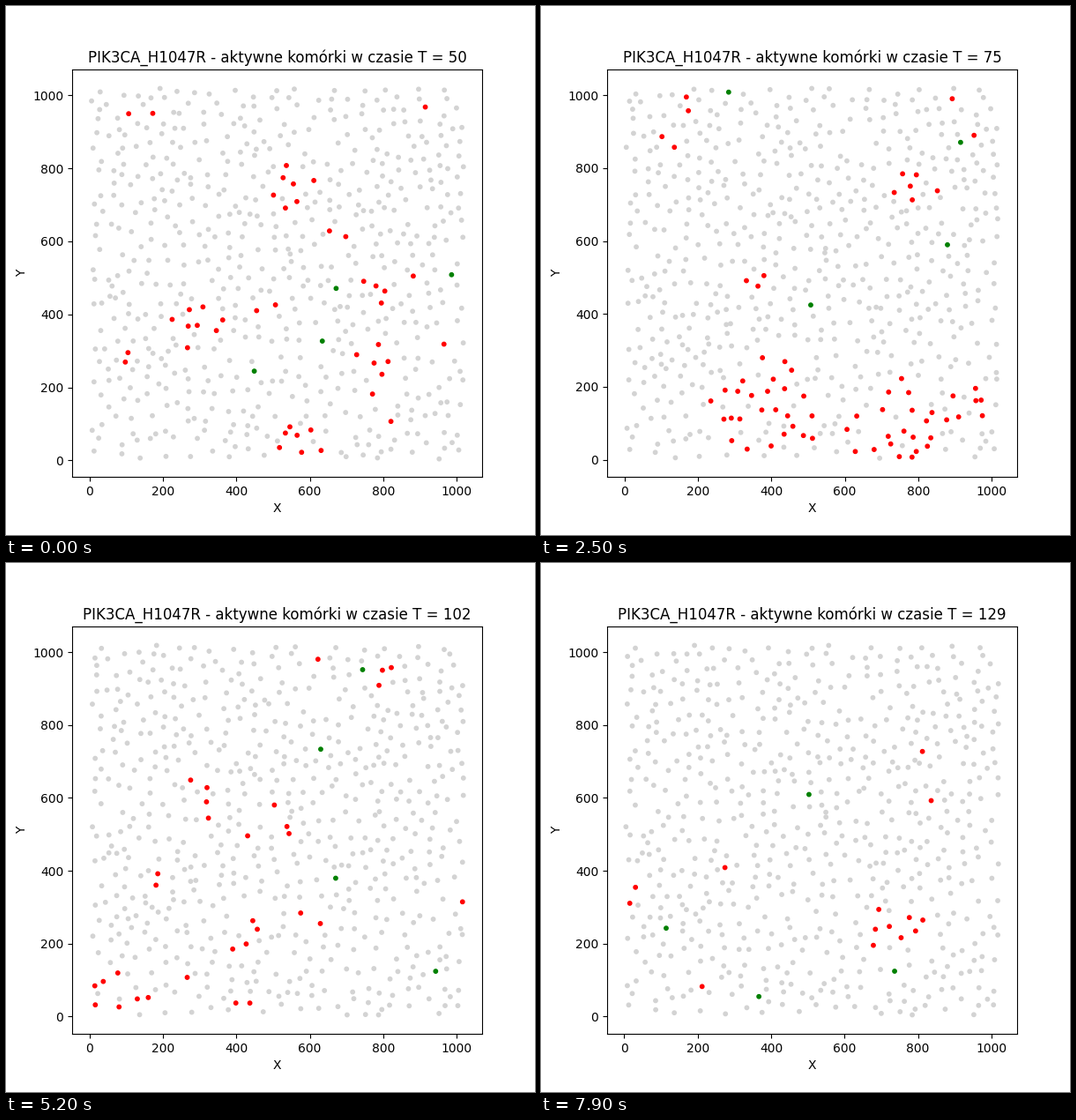
These frames come from a looping animation (600x600 px, 8 s). A matplotlib script:

```python
import numpy as np
import matplotlib.pyplot as plt
from matplotlib.animation import FuncAnimation

FRAMES, INTERVAL, START = 80, 100, 50
CELLS, LOW, HIGH = 625, 4, 1019
COLORS = np.array(["lightgray", "red", "green"])
RED, GREEN = 1, 2
LIFETIME = 6

# Largest bursts: peak time, x, y, number of active cells
BURSTS = [
    (50, 291, 371, 8), (50, 554, 757, 7),
    (75, 378, 135, 26), (75, 720, 64, 14),
    (85, 141, 705, 13), (85, 464, 368, 9), (85, 1003, 538, 9),
    (117, 907, 538, 8),
]

rng = np.random.default_rng(1047)


def scatter_cells():
    """Loosely even spread that includes the burst centres."""
    points = [np.array(burst[1:3], float) for burst in BURSTS]
    while len(points) < CELLS:
        candidates = rng.uniform(LOW, HIGH, (6, 2))
        gaps = np.linalg.norm(candidates[:, None] - np.array(points), axis=2).min(axis=1)
        points.append(candidates[gaps.argmax()])
    return np.array(points)


def activate(state, cell, first, length, kind=RED):
    state[max(first, 0):max(first + length, 0), cell] = kind


def spread(state, peak, x, y, count):
    """Activity runs outwards from a centre and is widest at the peak."""
    distance = np.hypot(*(home - (x, y)).T)
    near = distance.argsort()[:int(1.6 * count) + 1]
    others = rng.choice(near[1:], count - 1, replace=False)
    for cell in [near[0], *others]:
        delay = round(3 * distance[cell] / distance[near[-1]])
        activate(state, cell, peak - 4 + delay, LIFETIME)


def build_activity():
    state = np.zeros((FRAMES, CELLS), int)
    pending = 0
    for peak in range(-2, FRAMES + 4):
        # Enough small waves to hold a level that falls off late in the loop
        pending += np.interp(peak, [52, 67], [32, 14]) / LIFETIME
        while pending > 0:
            count = int(rng.integers(1, 8))
            spread(state, peak, *rng.uniform(LOW, HIGH, 2), count)
            pending -= count
    for peak, x, y, count in BURSTS:
        spread(state, peak - START, x, y, count)
    for frame in range(-1, FRAMES):
        for cell in rng.integers(CELLS, size=2):
            activate(state, cell, frame, 2, GREEN)
    return state


home = scatter_cells()
activity = build_activity()
phase = rng.uniform(0, 2 * np.pi, (2, CELLS, 2))
reach = rng.uniform(1, 5, (CELLS, 2))


def positions(frame):
    slow = np.sin(2 * np.pi * frame / 95 + phase[0])
    quick = np.sin(2 * np.pi * frame / 17 + phase[1])
    return np.clip(home + reach * slow + 1.2 * quick, LOW, HIGH)


fig, ax = plt.subplots(figsize=(6, 6), dpi=100)
dots = ax.scatter(*home.T, s=10, c="lightgray")
title = ax.set_title("")
ax.set_xlabel("X")
ax.set_ylabel("Y")


def update(frame):
    time = START + frame
    dots.set_offsets(positions(frame))
    dots.set_color(COLORS[activity[frame]])
    title.set_text(f"PIK3CA_H1047R - aktywne komórki w czasie T = {time}")
    # The limits follow the slowly shifting extent of the cells
    ax.set_xlim(np.interp(time, [117, 129], [-48, -46.5]), 1070)
    ax.set_ylim(np.interp(time, [50, 85], [-45, -48]), 1071)
    return dots, title


animation = FuncAnimation(fig, update, frames=FRAMES, interval=INTERVAL,
                          repeat=True, repeat_delay=0)
plt.show()
```
